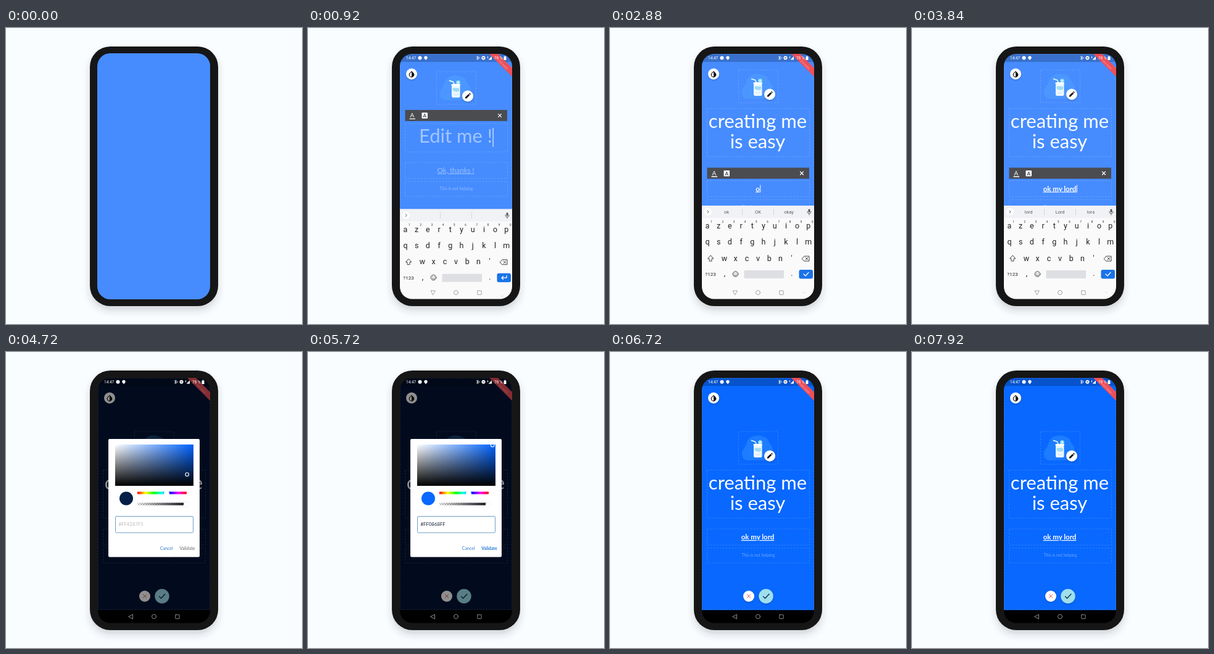
An HTML page for the animation above (8000 ms loop, 480x480 px).

```html
<!DOCTYPE html>
<html lang="en">
<head>
<meta charset="utf-8">
<title>Phone editor</title>
<style>
  html, body { margin: 0; width: 100%; height: 100%; overflow: hidden; background: #f9fdff; }
  svg { display: block; width: 100vw; height: 100vh; }
  text { font-family: Lato, sans-serif; white-space: pre; text-anchor: middle; }
  .sys, .sys text { font-family: Roboto, sans-serif; }
  .left, .sys .left { text-anchor: start; }
  .dash { fill: none; stroke: #fff; stroke-opacity: .22; stroke-width: .7; stroke-dasharray: 3 2; }
  .line { fill: none; stroke-linecap: round; stroke-linejoin: round; }
  .u { text-decoration: underline; text-decoration-thickness: 6%; }
</style>
</head>
<body>
<svg viewBox="0 0 480 480">
  <defs>
    <clipPath id="screen"><rect x="149" y="42" width="182" height="397.500" rx="20"/></clipPath>
    <filter id="shadow" x="-20%" y="-10%" width="140%" height="125%">
      <feDropShadow dx="0" dy="7" stdDeviation="6" flood-color="#33304a" flood-opacity=".2"/>
    </filter>
    <filter id="soft" x="-50%" y="-50%" width="200%" height="200%">
      <feDropShadow dx="0" dy="1" stdDeviation="1" flood-opacity=".3"/>
    </filter>
    <linearGradient id="saturation"><stop stop-color="#fff"/><stop offset="1" stop-color="#0063ff"/></linearGradient>
    <linearGradient id="value" x2="0" y2="1"><stop stop-opacity="0"/><stop offset="1"/></linearGradient>
    <linearGradient id="alpha"><stop stop-opacity="0"/><stop offset="1" stop-color="#080c18"/></linearGradient>
    <linearGradient id="hue">
      <stop stop-color="#f00"/><stop offset=".167" stop-color="#ff0"/><stop offset=".333" stop-color="#0f0"/>
      <stop offset=".5" stop-color="#0ff"/><stop offset=".667" stop-color="#00f"/>
      <stop offset=".833" stop-color="#f0f"/><stop offset="1" stop-color="#f00"/>
    </linearGradient>
    <pattern id="checker" width="4" height="4" patternUnits="userSpaceOnUse">
      <path d="M0 0h2v2h-2zM2 2h2v2h-2z" fill="#bbb"/>
    </pattern>
  </defs>

  <rect x="136" y="30" width="208" height="421" rx="33" fill="#151515" filter="url(#shadow)"/>

  <g clip-path="url(#screen)">
    <rect id="page" x="148" y="41" width="184" height="378"/>
    <rect x="148" y="41" width="184" height="14" opacity=".2"/>
    <rect class="dash" x="149.500" y="42.500" width="181" height="375"/>
    <path d="M293 41H307L331 65V79Z" fill="#ee4f59"/>
    <text transform="translate(315.500 60.500) rotate(45)" font-size="3.600" fill="#fff" opacity=".6">EDIT MODE</text>

    <g filter="url(#soft)"><circle cx="168" cy="74.500" r="9" fill="#fff"/></g>
    <path d="M168 69.800L171 72.800A4.200 4.200 0 1 1 165 72.800Z" fill="#111"/>
    <path d="M168 71.200L165.700 73.500A3.200 3.200 0 0 0 168 79Z" fill="#fff"/>

    <!-- illustration, centred on its own origin -->
    <g id="picture">
      <rect class="dash" x="-32" y="-26.500" width="64" height="53"/>
      <path d="M-26 14C-29 3-20 0-19-8C-16-20 0-23 8-18C17-17 16-8 21-4C27 3 22 20 10 20H-14C-20 21-24 19-26 14Z" fill="#58b4ff" opacity=".26"/>
      <path class="line" d="M-2-4L-5-10L-11-12" stroke="#e8faff" stroke-width="1.600"/>
      <circle cx="3" cy="-9" r="3.500" fill="#7fd4f2"/><circle cx="3" cy="-9" r="2" fill="#c6f3fb"/>
      <rect x="-8" y="-6.500" width="14.500" height="3.500" rx="1.500" fill="#fff"/>
      <rect x="-7.500" y="-4" width="13.500" height="19.500" rx="2.500" fill="#effaff"/>
      <path d="M-6 0H4.500V5Q0 8-6 4Z" fill="#9fdcf8"/>
      <path class="line" d="M-4 9L-1 12L3 9" stroke="#b7dcff"/>
      <g filter="url(#soft)"><circle cx="18.500" cy="13" r="9" fill="#fff"/></g>
      <path d="M14.500 17V15L19.800 9.700L21.800 11.700L16.500 17ZM20.500 9L21.500 8L23.500 10L22.500 11Z" fill="#111"/>
    </g>

    <g id="title" font-size="31" fill="#fff">
      <rect id="titleBox" class="dash" x="157.500" width="166" y="-23" height="78"/>
      <text id="line1" x="239.500" y="8.500"></text>
      <text id="line2" x="239.500" y="41"></text>
    </g>
    <g id="button" font-size="11.500" fill="#fff">
      <rect class="dash" x="157.500" y="-13" width="166" height="26"/>
      <text id="label" class="u" x="239.500" y="4"></text>
    </g>
    <g id="helper">
      <rect class="dash" x="157.500" y="-12" width="166" height="24"/>
      <text x="240.500" y="2.300" font-size="6.800" fill="#fff" opacity=".4">This is not helping</text>
    </g>
    <rect id="cursor" width="1" fill="#fff"/>

    <g id="toolbar">
      <rect x="157.500" y="-9" width="165.500" height="18" fill="#4b4c50"/>
      <text x="169" y="3" font-size="10" fill="#fff">A</text>
      <path d="M164.500 5.500H174" stroke="#fff" stroke-width="1.300"/>
      <rect x="184.500" y="-4.500" width="9.500" height="9.500" rx="1" fill="#fff"/>
      <text x="189.200" y="3" font-size="8" font-weight="700" fill="#4b4c50">A</text>
      <path class="line" d="M308.500-2.500L313.500 2.500M313.500-2.500L308.500 2.500" stroke="#fff" stroke-width="1.200"/>
    </g>

    <g id="actions">
      <g filter="url(#soft)"><circle cx="225" cy="396" r="9" fill="#fff"/><circle cx="253" cy="396" r="11.700" fill="#9fdfeb"/></g>
      <path class="line" d="M222.200 393.200L227.800 398.800M227.800 393.200L222.200 398.800" stroke="#e5505d" stroke-width=".9"/>
      <path class="line" d="M248.500 396.500L251.500 399.500L258 392.500" stroke="#10284c" stroke-width="1.300"/>
    </g>

    <rect id="barrier" x="148" y="41" width="184" height="378"/>
    <rect x="148" y="418.500" width="184" height="22"/>

    <g id="keyboard" class="sys" fill="#202124">
      <rect x="148" y="288" width="184" height="153" fill="#fafafb"/>
      <rect x="148" y="288" width="184" height="20" fill="#f1f2f5"/>
      <circle cx="159" cy="298" r="6" fill="#fff"/>
      <path class="line" d="M158 296L160 298L158 300" stroke="#555"/>
      <path d="M214.500 293V303M265.500 293V303" stroke="#d4d6da"/>
      <g id="suggestions" font-size="7.500" fill="#555b62"></g>
      <rect x="321.500" y="293.500" width="3" height="5.500" rx="1.500" fill="#555"/>
      <path class="line" d="M319.800 297.500Q320 301 323 301T326.200 297.500M323 301V303" stroke="#555" stroke-width=".9"/>
      <g id="keys"></g>
      <path class="line" d="M163 369L158.500 374H161V378H165V374H167.500Z" stroke="#444"/>
      <path class="line" d="M311.500 374L315 370H323V378H315ZM317 372L321 376M321 372L317 376" stroke="#444"/>
      <g class="line" stroke="#444"><circle cx="203.500" cy="399" r="4.300"/><path d="M201 400Q203.500 403 206 400M202 397.300V397.800M205 397.300V397.800"/></g>
      <rect x="217.500" y="393" width="64.500" height="13" rx="1" fill="#dedfe2"/>
      <rect x="306.500" y="392" width="22.500" height="14.500" rx="3" fill="#1a73e8"/>
      <path id="enter" class="line" stroke="#fff" stroke-width="1.300"/>
      <path class="line" d="M313 428L315 430L317 428" stroke="#ddd"/>
    </g>
    <g class="line" stroke="#999" stroke-width=".9">
      <path id="back" d="M199 429L205.500 425.500V432.500Z"/>
      <circle cx="240" cy="429" r="3.500"/><rect x="274.800" y="426" width="6.400" height="6.400" rx=".5"/>
    </g>

    <g id="dialog">
      <rect x="166" y="141" width="148" height="191.500" rx="2" fill="#fff"/>
      <rect x="177" y="150" width="127" height="67" fill="url(#saturation)"/>
      <rect x="177" y="150" width="127" height="67" fill="url(#value)"/>
      <circle id="knob" r="2.800" fill="none" stroke="#fff" stroke-width="1.100"/>
      <circle id="swatch" cx="195" cy="237.500" r="11"/>
      <rect x="213" y="226.500" width="80" height="4" rx="1" fill="url(#hue)"/>
      <circle cx="260.500" cy="229.500" r="4.500" fill="#fff"/>
      <rect x="213" y="244.500" width="80" height="4" fill="url(#checker)"/>
      <rect x="213" y="244.500" width="80" height="4" fill="url(#alpha)"/>
      <circle cx="292.500" cy="247" r="4.500" fill="#fff" stroke="#ddd" stroke-width=".4"/>
      <rect x="177.500" y="266.500" width="126" height="26.500" rx="1.500" fill="#fff" stroke="#6f9fc4"/>
      <text id="hex" class="left" x="182.500" y="282" font-size="7.800"></text>
      <text x="260.300" y="320.500" font-size="7.100" fill="#2f7bd0">Cancel</text>
      <text id="validate" x="294" y="320.500" font-size="7.100">Validate</text>
    </g>

    <g class="sys" fill="#fff">
      <text class="left" x="159" y="51" font-size="6.500">14:47</text>
      <circle cx="181.500" cy="48.500" r="3"/>
      <path d="M191 45.500A2.700 2.700 0 0 1 193.700 48.200Q193.500 50 191 52Q188.500 50 188.300 48.200A2.700 2.700 0 0 1 191 45.500Z"/>
      <path class="line" d="M273.500 46.500L276.500 50L275 51.500V45.500L276.500 47L273.500 50.500M278 47.500V49.500" stroke="#fff" stroke-width=".8"/>
      <circle cx="284.500" cy="48.500" r="3"/><path d="M283 48.500H286" stroke="#333"/>
      <path d="M292.500 51.500L298 46V51.500ZM291 46H292V49H291Z"/>
      <text class="left" x="302" y="51" font-size="6.500">76 %</text>
      <path d="M317.500 46.500H318.500V45.500H320.500V46.500H321.500V52H317.500Z"/>
    </g>
  </g>
  <rect id="blank" x="148" y="41" width="183" height="399" rx="21" fill="#468cff"/>
</svg>

<script>
const LOOP = 8000;
const $ = id => document.getElementById(id);
const set = (id, attrs) => { for (const k in attrs) $(id).setAttribute(k, attrs[k]); };
const linear = (t, a, b) => Math.min(1, Math.max(0, (t - a) / (b - a)));
const ramp = (t, a, b) => { const p = linear(t, a, b); return p * p * (3 - 2 * p); };
const mix = (a, b, p) => a + (b - a) * p;
const mixColor = (a, b, p) => `rgb(${a.map((v, i) => Math.round(mix(v, b[i], p)))})`;
const moveY = (id, y) => set(id, { transform: `translate(0 ${y})` });

const TITLE = 'creating me is easy', LABEL = 'ok my lord', FIRST_LINE = 'creating me';
const SKY = [70, 140, 255], NAVY = [3, 20, 53], ROYAL = [8, 104, 255];
const SUGGESTIONS = {
  creating: ['creating', 'creation', 'creative'], me: ['me', 'mes', 'men'],
  is: ['is', 'isn\'t', 'island'], easy: ['easy', 'easiest', 'easyer'],
  ok: ['ok', 'OK', 'okay'], my: ['my', 'My', 'myself'], lord: ['lord', 'Lord', 'lors']
};

function buildKeys() {
  const key = (c, x, y, size = 12.5) => `<text x="${x}" y="${y}" font-size="${size}">${c}</text>`;
  const row = (chars, x, y) => [...chars].map((c, i) => key(c, x + i * 18.2, y)).join('');
  const digits = [...'1234567890'].map((c, i) => key(c, 164.5 + i * 18.2, 315.5, 4.5)).join('');
  $('keys').innerHTML = row('azertyuiop', 158, 325) + digits + row('qsdfghjklm', 158, 351) +
    row("wxcvbn'", 185.5, 377.5) + key('?123', 163, 402, 8) + key(',', 186, 402) + key('.', 295, 402);
  $('suggestions').innerHTML = [189, 240, 290].map(x => `<text x="${x}" y="300.800"></text>`).join('');
}

// Underlines the word being typed.
function compose(id, text, active) {
  const cut = active ? text.lastIndexOf(' ') + 1 : text.length;
  $(id).innerHTML = `${text.slice(0, cut)}<tspan class="u">${text.slice(cut)}</tspan>`;
}

function pickedColor(s, v) {
  const max = 255 * v, min = max * (1 - s);
  return [min, mix(min, max, 96 / 247), max].map(Math.round);
}

function drawEditor(t) {
  const keyboard = ramp(t, 700, 950) - ramp(t, 4050, 4300);
  const titleBar = ramp(t, 700, 850) - ramp(t, 2400, 2550);
  const labelBar = ramp(t, 2400, 2550) - ramp(t, 4050, 4200);
  const onTitle = t >= 700 && t < 2400, onLabel = t >= 2400 && t < 4050;
  const title = TITLE.slice(0, Math.floor(linear(t, 1000, 1950) * TITLE.length));
  const label = LABEL.slice(0, Math.floor(linear(t, 2700, 3650) * LABEL.length));
  const wrapped = title.length > FIRST_LINE.length + 1;
  const center = wrapped ? 0 : 16 * (1 - keyboard);
  const lift = center - 61 * keyboard;
  const titleY = 214.5 + lift + 21.5 * titleBar;
  const below = lift + 21.5 * (titleBar + labelBar) - (wrapped ? 0 : 32.5);
  const buttonY = 300 + below;

  set('picture', { transform: `translate(240.5 ${155.5 + lift})` });
  moveY('title', titleY);
  moveY('button', buttonY);
  moveY('helper', 330 + below);
  moveY('keyboard', 153 * (1 - keyboard));
  set('back', { transform: `rotate(${-90 * keyboard} 202.5 429)` });
  set('titleBox', { height: wrapped ? 78 : 46 });

  compose('line1', title ? title.slice(0, wrapped ? FIRST_LINE.length : undefined) : 'Edit me !', onTitle && title && !wrapped);
  compose('line2', wrapped ? title.slice(FIRST_LINE.length + 1) : '', onTitle);
  set('line1', { opacity: title ? 1 : .5 });
  $('label').textContent = label || 'Ok, thanks !';
  set('label', { opacity: label ? 1 : .45, 'font-weight': label ? 700 : 400 });

  moveY('toolbar', onTitle ? titleY - 36 : buttonY - 25);
  set('toolbar', { opacity: onTitle ? titleBar : labelBar });
  set('actions', { opacity: 1 - keyboard });

  const line = $(onLabel ? 'label' : wrapped ? 'line2' : 'line1');
  set('cursor', {
    x: 240 + line.getComputedTextLength() / 2,
    y: onLabel ? buttonY - 6 : titleY - 16 + (wrapped ? 32.5 : 0),
    height: onLabel ? 12 : 31,
    opacity: onTitle || onLabel ? 1 : 0
  });

  const typed = onLabel ? label : title, full = onLabel ? LABEL : TITLE;
  const word = full.split(' ')[typed.split(' ').length - 1];
  [...$('suggestions').children].forEach((el, i) => { el.textContent = typed ? SUGGESTIONS[word][i] : ''; });
  set('enter', { d: t >= 2400 ? 'M314 399L317 402L322 396.5' : 'M322 396V399.5H314M316.5 397L314 399.5L316.5 402' });
}

function drawPicker(t) {
  const open = ramp(t, 4450, 4620) - ramp(t, 6100, 6280);
  const drag = ramp(t, 5000, 5500), edited = drag > 0;
  const s = mix(.925, 247 / 255, drag), v = mix(.28, 1, drag);
  const color = pickedColor(s, v);
  const hex = color.map(c => c.toString(16).padStart(2, '0')).join('').toUpperCase();

  set('page', { fill: mixColor(t < 5500 ? SKY : ROYAL, NAVY, open) });
  set('barrier', { opacity: .44 * open });
  set('dialog', { opacity: open });
  set('knob', { cx: 176.2 + 127 * s, cy: 217 - 66 * v });
  set('swatch', { fill: `rgb(${color})` });
  $('hex').textContent = edited ? '#FF' + hex : '#FF4287F5';
  set('hex', { fill: edited ? '#17253d' : '#bbb' });
  set('validate', { fill: edited ? '#1f78d8' : '#666', 'font-weight': edited ? 700 : 400 });
}

function frame(now) {
  const t = now % LOOP;
  drawEditor(t);
  drawPicker(t);
  set('blank', { opacity: 1 - ramp(t, 40, 400) });
  requestAnimationFrame(frame);
}

buildKeys();
requestAnimationFrame(frame);
</script>
</body>
</html>
```
